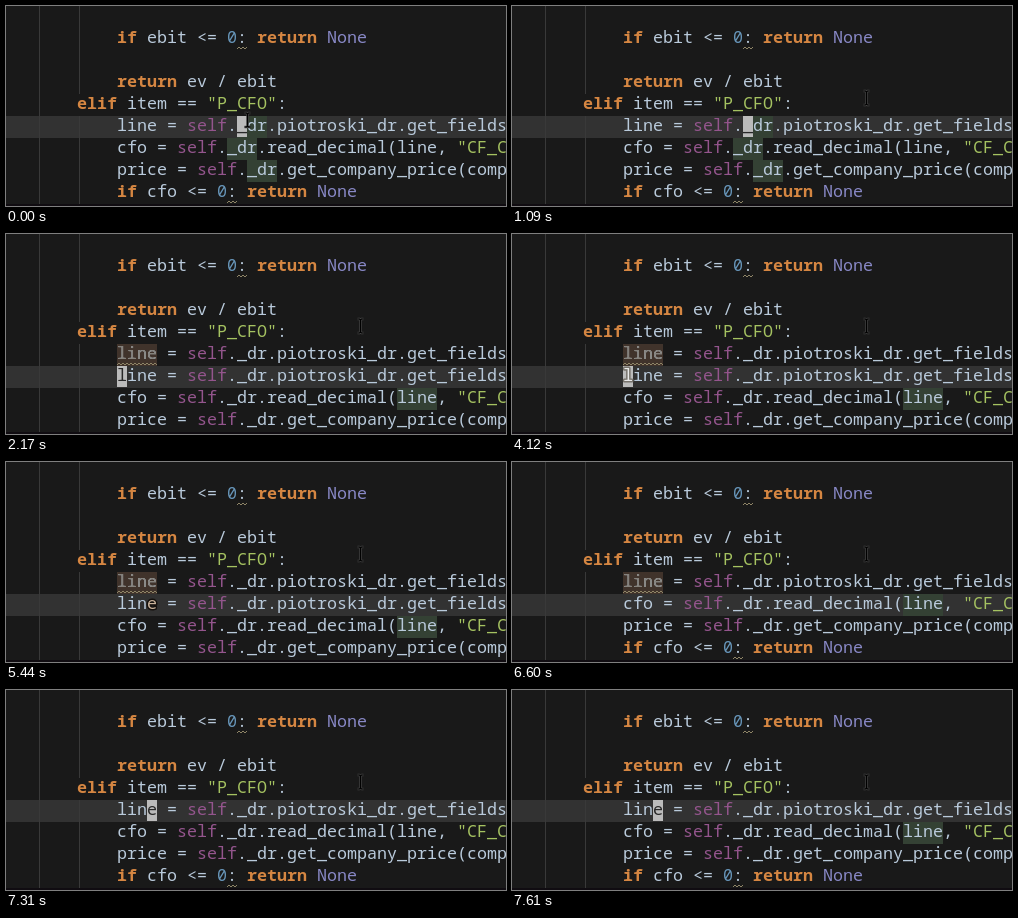
Write an HTML page with a canvas that moves like this. It is 500x200 px and loops after 8 s.

```html
<!DOCTYPE html>
<html lang="en">
<head>
<meta charset="utf-8">
<title>Code editor</title>
<style>
  html, body { margin: 0; overflow: hidden; background: #191919; }
  canvas { display: block; }
</style>
</head>
<body>
<canvas id="stage" width="500" height="200"></canvas>
<script>
const ctx = document.getElementById('stage').getContext('2d');
const LOOP = 8000, CELL = 10, ROW = 22, LEFT = 111;
const FONT = '16.667px "Noto Sans Mono", monospace';
const BG = '#191919', TEXT = '#b9cadb', GREEN = '#344134', BROWN = '#40332b', CARET = '#bbbbbb';

const LINE = 'line = self._dr.piotroski_dr.get_fields';
const CFO = 'cfo = self._dr.read_decimal(line, "CF_C';
const PRICE = 'price = self._dr.get_company_price(comp';
const IF_CFO = 'if cfo <= 0: return None';
const TOKEN = /"[^"]*"?|\w+|[^\w\s"]+/g;

const colX = col => LEFT + col * CELL;

function tokenColor(word) {
  if (/^(if|elif|return)$/.test(word)) return '#d58642';
  if (word === 'self') return '#94558d';
  if (word === 'None') return '#8888c6';
  if (word[0] === '"') return '#a5c261';
  if (/^\d+$/.test(word)) return '#6897bb';
  return TEXT;
}

function rect(color, x, y, w, h) {
  ctx.fillStyle = color;
  ctx.fillRect(x, y, w, h);
}

function glyphs(text, col, row, color, bold) {
  ctx.font = (bold ? 'bold ' : '') + FONT;
  ctx.fillStyle = color;
  ctx.fillText(text, colX(col), row * ROW + 15);
}

function codeLine(text, row, col = 0) {
  for (const { 0: word, index } of text.matchAll(TOKEN)) {
    glyphs(word, col + index, row, tokenColor(word), /^(if|elif|return)$/.test(word));
  }
}

function highlight(col, row, length, color = GREEN) {
  rect(color, colX(col), row * ROW, length * CELL, ROW);
}

function squiggle(col, row, length) {
  const x = colX(col), y = row * ROW + 20;
  ctx.beginPath();
  for (let i = 0; i <= length * CELL; i += 2) ctx.lineTo(x + i, y + (i % 4 ? -1 : 1));
  ctx.strokeStyle = '#8f8567';
  ctx.lineWidth = 1;
  ctx.stroke();
}

function caret(col, row, char) {
  rect(CARET, colX(col), row * ROW, CELL, ROW - 1);
  glyphs(char, col, row, '#282828');
}

function outlinedGlyph(char, col, row, outline, color) {
  ctx.font = FONT;
  ctx.strokeStyle = outline;
  ctx.lineWidth = 3;
  ctx.lineJoin = 'round';
  ctx.strokeText(char, colX(col), row * ROW + 15);
  glyphs(char, col, row, color);
}

function pointer(t) {
  const step = t < 80 ? 0 : Math.min(4, 1 + Math.floor((t - 80) / 76));
  const x = Math.round(241 + 113 * step / 4) + 0.5;
  const y = Math.round(114 - 22 * step / 4);
  for (const [color, width] of [['#4a4a4a', 2.4], ['#000', 1.2]]) {
    ctx.strokeStyle = color;
    ctx.lineWidth = width;
    ctx.beginPath();
    ctx.moveTo(x - 3, y - 7);
    ctx.lineTo(x - 1, y - 7);
    ctx.lineTo(x, y - 6);
    ctx.lineTo(x + 1, y - 7);
    ctx.lineTo(x + 3, y - 7);
    ctx.moveTo(x, y - 6);
    ctx.lineTo(x, y + 6);
    ctx.moveTo(x - 3, y + 7);
    ctx.lineTo(x - 1, y + 7);
    ctx.lineTo(x, y + 6);
    ctx.lineTo(x + 1, y + 7);
    ctx.lineTo(x + 3, y + 7);
    ctx.stroke();
  }
}

function drawCaret(t) {
  if (t < 1790) {
    if (t < 630 || t >= 1090) caret(12, 5, '_');
  } else if (t < 5040) {
    caret(0, 6, 'l');
    const blink = (t >= 3110 && t < 3570) || (t >= 4120 && t < 4580);
    if (blink) outlinedGlyph('l', 0, 6, '#77736c', '#e8e8e8');
  } else if (t < 5270) {
    caret(1, 6, 'i');
  } else if (t < 5440) {
    caret(2, 6, 'n');
  } else if (t < 6600) {
    outlinedGlyph('e', 3, 6, '#15110e', '#c9b29a');
  } else if (t >= 7310) {
    caret(3, 5, 'e');
  }
}

function draw(t) {
  const copied = t >= 1790 && t < 6600;
  const activeRow = t >= 1790 && t < 7310 ? 6 : 5;
  const cfoRow = copied ? 7 : 6;

  // Rows are offset so that row 1 starts at y = 22.
  rect(BG, 0, 0, 500, 200);
  rect('#323232', 0, activeRow * ROW, 500, ROW);
  rect('#393939', 33, 0, 1, 198);
  rect('#393939', 73, 0, 1, 88);
  rect('#393939', 73, 110, 1, 88);

  if (t < 2100) {
    highlight(12, 5, 3);
    highlight(11, cfoRow, 3);
    highlight(13, cfoRow + 1, 3);
  }
  if (t >= 2100 && t < 6990) highlight(0, 5, 4, BROWN);
  if ((t >= 2100 && t < 6680) || t >= 7610) highlight(28, cfoRow, 4);

  codeLine('if ebit <= 0: return None', 1);
  squiggle(12, 1, 1);
  codeLine('return ev / ebit', 3);
  codeLine('elif item == "P_CFO":', 4, -4);
  codeLine(LINE, 5);
  if (t >= 2170 && t < 7060) {
    glyphs('line', 0, 5, '#85827c');
    squiggle(0, 5, 4);
  }
  if (copied) codeLine(LINE, 6);
  codeLine(CFO, cfoRow);
  codeLine(PRICE, cfoRow + 1);
  if (!copied) {
    codeLine(IF_CFO, 8);
    squiggle(11, 8, 1);
  }

  drawCaret(t);
  rect('#100c11', 0, 198, 500, 2);
  pointer(t);
}

const start = performance.now();
function tick() {
  draw((performance.now() - start) % LOOP);
  requestAnimationFrame(tick);
}
tick();
</script>
</body>
</html>
```
